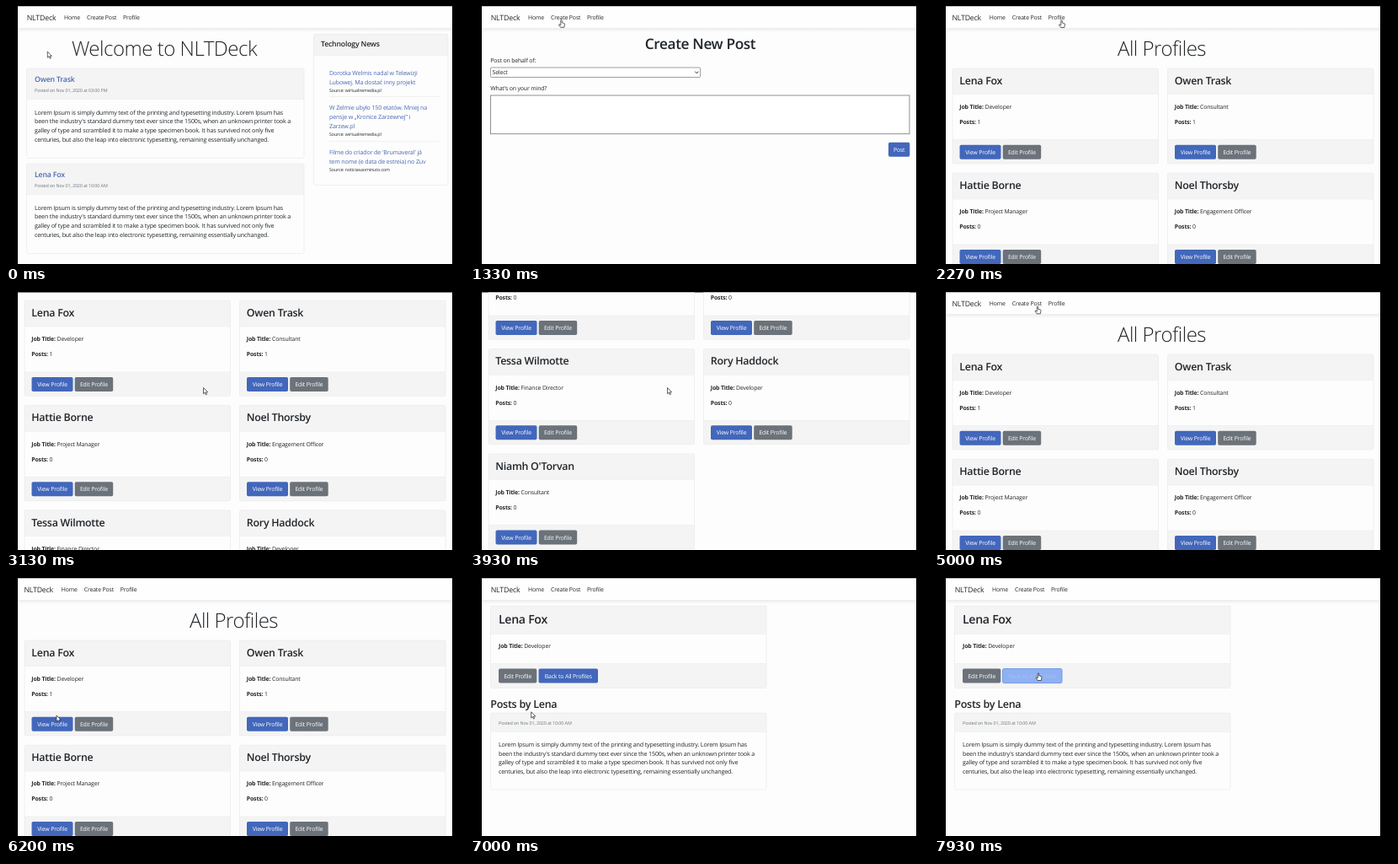
Recreate the animation shown at these times as an HTML page. Size 544 by 306 pixels, loop 8000 ms.

```html
<!DOCTYPE html>
<html lang="en">
<head>
<meta charset="utf-8">
<style>
html, body { margin: 0; width: 100%; height: 100%; overflow: hidden; background: #000; }
svg { display: block; }
text { font-family: "Open Sans", "Noto Sans", sans-serif; letter-spacing: -.02em; fill: #212529; text-rendering: geometricPrecision; white-space: pre; }
.light { font-weight: 300; }
.semi { font-weight: 600; }
.bold { font-weight: 700; }
.link { fill: #4a68b4; }
.muted { fill: #6c757d; }
.on { fill: #fff; }
.mid { text-anchor: middle; }
</style>
</head>
<body>
<svg id="stage" width="544" height="306" viewBox="0 0 544 306"></svg>
<script>
const BRAND = 'NLTDeck', BLUE = '#4267bb', GREY = '#6b7279', LINE = '#e7e8e9';
const LOREM = [
  'Lorem Ipsum is simply dummy text of the printing and typesetting industry. Lorem Ipsum has',
  "been the industry's standard dummy text ever since the 1500s, when an unknown printer took a",
  'galley of type and scrambled it to make a type specimen book. It has survived not only five',
  'centuries, but also the leap into electronic typesetting, remaining essentially unchanged.'
];

const text = (x, y, str, size = 6.9, cls = '') =>
  `<text x="${x}" y="${y}" font-size="${size}" class="${cls}">${str}</text>`;
const rect = (x, y, w, h, fill, extra = '') =>
  `<rect x="${x}" y="${y}" width="${w}" height="${h}" fill="${fill}" ${extra}/>`;
const lines = (x, y, list, cls) =>
  list.map((str, i) => text(x, y + i * 10.7, str, 7.1, cls)).join('');
const button = (x, y, w, label, fill, id = '') =>
  rect(x, y, w, 17, fill, `rx="1.8" ${id}`) + text(x + w / 2, y + 11, label, 6.9, 'mid on');
const field = (label, value) => `<tspan class="bold">${label}:</tspan> ${value}`;

// Bordered card with a tinted header and an optional tinted footer.
function card(x, y, w, h, head, foot = 0) {
  const tint = '#f4f4f4';
  return rect(x, y, w, h, '#fdfdfd', 'rx="2"') + rect(x, y, w, head, tint) +
    rect(x, y + head, w, .5, LINE) +
    (foot ? rect(x, y + h - foot, w, foot, tint) + rect(x, y + h - foot, w, .5, LINE) : '') +
    rect(x, y, w, h, 'none', `rx="2" stroke="${LINE}" stroke-width=".6"`);
}

const nav = dx => rect(14, 0, 516, 26, '#fefefe') + rect(14, 26, 516, 5, 'url(#shade)') +
  text(24.7 + dx, 16.8, BRAND, 8.75) +
  [[69, 'Home'], [96, 'Create Post'], [139, 'Profile']]
    .map(([x, label]) => text(x + dx, 15.8, label)).join('');

const post = (y, name, hour) => card(24.5, y, 329.5, 106.5, 36.5) +
  text(34, y + 15.5, name, 8.75, 'semi link') +
  text(34, y + 28.3, `Posted on Nov 01, 2020 at ${hour}`, 5.4, 'muted') +
  lines(34, y + 54.5, LOREM);

const news = (y, title, source) => lines(384, y, title, 'link') +
  text(384, y + title.length * 10.7 - 1.4, 'Source: ' + source, 5.3);

function profile([name, job, posts], i) {
  const x = i % 2 ? 277.5 : 22, y = 74 + (i >> 1) * 124.3;
  return card(x, y, 244.5, 113, 30.5, 28.5) +
    text(x + 8.3, y + 18.7, name, 12.4, 'semi') +
    text(x + 8.3, y + 48, field('Job Title', job)) +
    text(x + 8.3, y + 66, field('Posts', posts)) +
    button(x + 8.5, y + 90.7, 49, 'View Profile', BLUE) +
    button(x + 59.7, y + 90.7, 45.5, 'Edit Profile', GREY);
}

const pages = {
  home: nav(0) + text(188, 58.5, 'Welcome to ' + BRAND, 24, 'light mid') +
    post(74, 'Owen Trask', '03:00 PM') + post(187, 'Lena Fox', '10:00 AM') +
    card(365.5, 33.5, 159.5, 179, 25) + text(374, 48, 'Technology News', 8.7, 'semi') +
    news(81.8, ['Dorotka Welmis nadal w Telewizji', 'Lubowej. Ma dostać inny projekt'], 'wirtualnemedia.pl') +
    rect(384, 107, 131, .6, LINE) +
    news(123.3, ['W Zelmie ubyło 150 etatów. Mniej na', 'pensje w „Kronice Zarzewnej” i', 'Zarzew.pl'], 'wirtualnemedia.pl') +
    rect(384, 160.5, 131, .6, LINE) +
    news(175.8, ["Filme do criador de 'Brumaveral' já", 'tem nome (e data de estreia) no Zuv'], 'noticiasaominuto.com'),

  create: nav(0) + text(273.5, 51, 'Create New Post', 17.2, 'semi mid') +
    text(24.3, 66.5, 'Post on behalf of:') +
    rect(24.5, 73, 249, 11.5, '#fff', 'rx="1" stroke="#777" stroke-width=".7"') +
    text(26.5, 81.2, 'Select') +
    '<path d="M267.3 77.7l2 2 2-2" fill="none" stroke="#222"/>' +
    text(24.3, 99.5, "What's on your mind?") +
    rect(24.5, 106, 497.5, 45.7, '#fff', 'stroke="#777" stroke-width=".8"') +
    button(497, 161.7, 25.3, 'Post', BLUE),

  profiles: nav(-3.3) + text(270.5, 58.5, 'All Profiles', 24, 'light mid') + [
    ['Lena Fox', 'Developer', 1], ['Owen Trask', 'Consultant', 1],
    ['Hattie Borne', 'Project Manager', 0], ['Noel Thorsby', 'Engagement Officer', 0],
    ['Tessa Wilmotte', 'Finance Director', 0], ['Rory Haddock', 'Developer', 0],
    ["Niamh O'Torvan", 'Consultant', 0]
  ].map(profile).join(''),

  detail: nav(0) + card(24.5, 33, 327.5, 97.5, 33, 29) +
    text(34, 53.6, 'Lena Fox', 14.1, 'semi') + text(34, 83, field('Job Title', 'Developer')) +
    button(34, 107.6, 45.3, 'Edit Profile', GREY) +
    button(81.5, 107.6, 70.5, 'Back to All Profiles', BLUE, 'id="back"') +
    text(24.3, 154, 'Posts by Lena', 12.5, 'semi') + card(24.5, 160, 327.5, 91, 22) +
    text(34, 174, 'Posted on Nov 01, 2020 at 10:00 AM', 5.4, 'muted') + lines(34, 200, LOREM)
};

const stage = document.getElementById('stage');
stage.innerHTML = `<defs>
  <linearGradient id="shade" x2="0" y2="1"><stop stop-color="#ebebec"/><stop offset="1" stop-color="#fdfdfd"/></linearGradient>
  <clipPath id="screen">${rect(14, .6, 516, 306, '#fff')}</clipPath></defs>
  <g clip-path="url(#screen)">${rect(14, 0, 516, 306, '#fdfdfd')}
  ${Object.entries(pages).map(([id, body]) => `<g id="${id}">${body}</g>`).join('')}</g>
  <g id="cursor" fill="#fff" stroke="#222" stroke-width=".7" stroke-linejoin="round">
  <path id="arrow" d="M0 0V7.2L1.7 5.7 2.9 8.3 4 7.8 2.9 5.3H5.1Z"/>
  <path id="hand" d="M-.7.5Q0-.5.7.5V3.3L3.4 4Q4.2 4.2 4 5.2L3.3 8.8H-.9L-3 5.5Q-2.4 4.6-.7 6Z"/></g>`;

const el = id => document.getElementById(id);
const show = (id, on) => el(id).style.display = on ? '' : 'none';

const LOOP = 8000;
const visits = [[0, 'home'], [1130, 'create'], [2070, 'profiles'], [6530, 'detail']];
const moves = [
  [0, 49.3, 54], [150, 49.3, 54], [870, 108.5, 16.5], [1400, 108.5, 16.5],
  [1870, 151.5, 16.7], [2350, 151.5, 16.7], [2850, 234.5, 113.5], [4470, 234.5, 113.5],
  [5000, 123, 17], [5200, 121, 18], [6200, 60, 163], [6330, 59, 171],
  [6750, 59, 171], [7600, 124, 112.7], [LOOP, 124, 112.7]
];
const scrolls = [[0, 0], [2870, 0], [3670, 255], [3980, 255], [4470, 0], [LOOP, 0]];
// Clickable areas: x, y, width, height.
const links = [[69, 8, 20, 12], [96, 8, 37, 12], [139, 8, 21, 12]];
const hot = {
  home: links, create: links,
  profiles: [...links.map(([x, ...r]) => [x - 3.3, ...r]), [30.5, 164.7, 49, 17]],
  detail: [...links, [34, 107.6, 45, 17], [81.5, 107.6, 70.5, 17]]
};

// Eased interpolation through [time, ...values] keys.
function track(keys, t) {
  const i = keys.findIndex(key => key[0] > t), a = keys[i - 1], b = keys[i];
  const u = (t - a[0]) / (b[0] - a[0]), k = u * u * (3 - 2 * u);
  return a.slice(1).map((v, n) => v + (b[n + 1] - v) * k);
}

function draw(now) {
  const t = now % LOOP, page = visits.filter(v => v[0] <= t).pop()[1];
  const [x, y] = track(moves, t), [scroll] = track(scrolls, t);
  const over = hot[page].findIndex(([l, top, w, h]) => x >= l && x <= l + w && y >= top && y <= top + h);
  for (const id in pages) show(id, id === page);
  el('profiles').setAttribute('transform', `translate(0 ${-scroll})`);
  el('cursor').setAttribute('transform', `translate(${x} ${y})`);
  show('hand', over >= 0);
  show('arrow', over < 0);
  const backHover = page === 'detail' && over === 4;
  el('back').setAttribute('fill', backHover ? '#8fb0f2' : BLUE);
  el('back').setAttribute('stroke', backHover ? '#7399e6' : 'none');
  el('back').nextSibling.style.opacity = backHover ? .2 : 1;
  requestAnimationFrame(draw);
}
requestAnimationFrame(draw);
</script>
</body>
</html>
```
